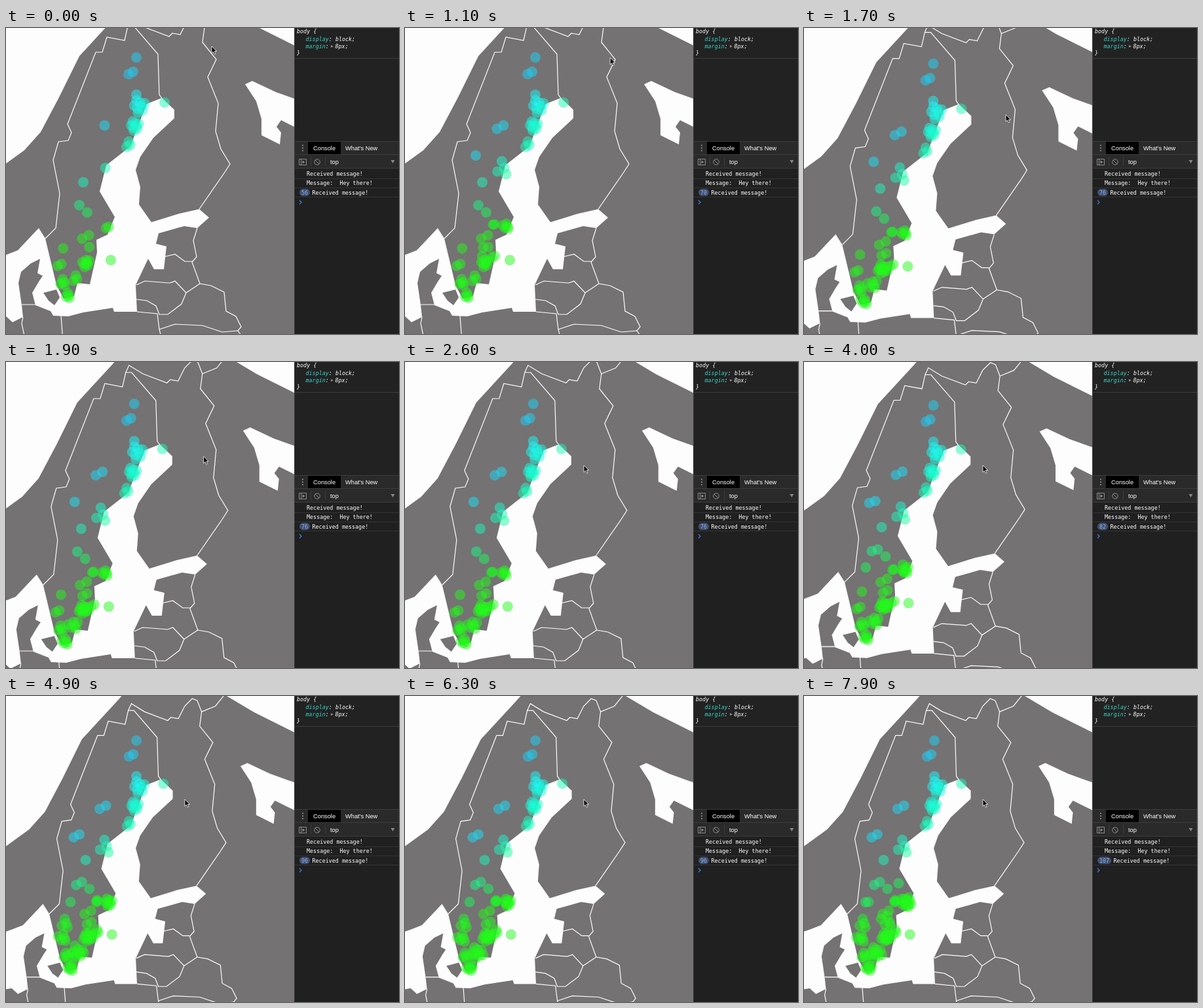
Recreate the animation shown at these times as an HTML page. Size 600 px wide and 468 px high, loop 8 s.

```html
<!DOCTYPE html>
<html lang="en">
<head>
<meta charset="utf-8">
<title>Live map with console</title>
<style>
  html, body { margin: 0; width: 100%; height: 100%; overflow: hidden; background: #222; }
  svg { display: block; width: 600px; height: 468px; }
  .sea { fill: #fefdfe; }
  .land { fill: #747273; }
  .border { fill: none; stroke: #fefdfe; stroke-width: 1.2; vector-effect: non-scaling-stroke; }
  .dots { fill-opacity: .5; }
  text { white-space: pre; fill: #fff; }
  .mono { font: 8.4px "DejaVu Sans Mono", monospace; }
  .rule { font-style: italic; }
  .ui { font: 9.3px "Liberation Sans", Arial, sans-serif; }
  .key { fill: #35d4c7; }
  .edge { stroke: #3c3c3c; }
  .icon { fill: none; stroke: #8c8c8c; }
</style>
</head>
<body>
<svg viewBox="0 0 600 468">
  <clipPath id="view"><rect width="440" height="468"/></clipPath>
  <g clip-path="url(#view)">
    <rect class="land" width="440" height="468"/>
    <g id="map">
      <!-- open water -->
      <path class="sea" d="M-30-60H206L169-19 112 43 81 106 53 159 28 187-30 229Z"/>
      <path class="sea" d="M330-60V-34L387 0 445 29 480 46V-60Z"/>
      <path class="sea" d="M365 86 376 81 412 98 440 108 480 122V170L440 151 420 141 413 151 420 160 418 178 390 164V139L382 112Z"/>
      <path class="sea" d="M-30 358 0 347 18 340 50 306 60 322 77 393 88 414 104 410 109 390 128 392 139 343 138 324 155 316 166 289 143 250 153 210 190 181 203 146 215 116 238 107 257 125V138L225 168 205 197 198 217 205 243 203 270 222 297 264 284 295 277 310 290 292 306 272 303 233 314 229 330 245 334 241 369H226L217 353 198 393 200 434H165L163 428 118 435 95 441 72 440 68 433 45 424H24L26 442 10 450 0 441-30 446Z"/>
      <path class="land" d="M52 353 38 360 23 373 19 390 24 424H45L40 405 50 388 56 379 48 375Z"/>
      <path class="land" d="M57 405 77 400 82 412 74 424 65 417Z"/>
      <!-- borders -->
      <path class="border" d="M60 322 76 306 82 253 72 202 80 174 95 172 100 160 94 147 137 37H147L154 14 181 19 186-3H195L232 40 234 102 239 109"/>
      <path class="border" d="M186-3 191-14 212-1 249 13 254 8 266 10 276-10 288-22 296-19 303-1 300 22 321 48 308 75 324 115 320 158 328 185 342 208 333 222 295 277"/>
      <path class="border" d="M303-1 325-10 341-30"/>
      <path class="border" d="M292 306 286 325 291 350 284 358 296 391 313 394 333 404 336 433 351 441 359 457 354 463 366 480"/>
      <path class="border" d="M241 350 258 346 273 357H284M199 393 212 387 250 390 258 387 275 405 296 391M199 415 215 417 229 425 234 438H247L268 422 275 405"/>
      <path class="border" d="M200 434 231 437 234 461 239 480M234 461 258 453 300 455 330 465 354 463M84 440 87 480M24 423H45M26 442 24 452 30 480"/>
    </g>
    <g id="dots" class="dots"></g>
  </g>

  <rect x="440" width="160" height="468" fill="#222"/>
  <g class="mono rule">
    <text x="444" y="8">body {</text>
    <text x="457.500" y="20"><tspan class="key">display</tspan>: block;</text>
    <text x="457.500" y="31"><tspan class="key">margin</tspan>:</text>
    <path d="M496 26 500 28 496 30Z" fill="#8a8a8a"/>
    <text x="502.500" y="31">8px;</text>
    <text x="444" y="41">}</text>
  </g>
  <path class="edge" d="M440 46.500H600"/>
  <rect x="440" y="173" width="160" height="41" fill="#2a2a2a"/>
  <path class="edge" d="M440 173.500H600M440 193.500H600M440 214.500H600"/>
  <rect x="461" y="174" width="50" height="19" fill="#000"/>
  <g fill="#9a9a9a"><circle cx="453" cy="179.500" r="1"/><circle cx="453" cy="183.500" r="1"/><circle cx="453" cy="187.500" r="1"/></g>
  <g class="ui">
    <text x="469" y="187">Console</text>
    <text x="518" y="187">What's New</text>
    <text x="495" y="207.500">top</text>
  </g>
  <path class="icon" d="M447.500 200.500H458.500V209.500H447.500ZM450.500 200.500V209.500"/>
  <path d="M452.500 202.500 456.500 205 452.500 207.500Z" fill="#8c8c8c"/>
  <path class="edge" d="M465.500 197V211M487.500 197V211"/>
  <circle class="icon" cx="475" cy="205" r="4.300"/>
  <path class="icon" d="M472 202 478 208"/>
  <path d="M587.500 202H593.500L590.500 207Z" fill="#888"/>
  <rect x="440" y="215" width="160" height="253" fill="#202021"/>
  <path class="edge" d="M440 230.500H600M440 244.500H600M440 258.500H600" style="stroke:#343434"/>
  <g class="mono">
    <text x="459" y="226">Received message!</text>
    <text x="459" y="240">Message:  Hey there!</text>
    <rect id="badge" x="448" y="246" width="16" height="11" rx="5.500" fill="#41506f"/>
    <text id="count" y="254.500" text-anchor="middle" style="fill:#8fb0ea"></text>
    <text id="label" y="254.500">Received message!</text>
  </g>
  <path d="M448 263.500 451 266.500 448 269.500" fill="none" stroke="#3b78cf" stroke-width="1.400"/>
  <path class="edge" d="M440.500 0V468"/>
  <path id="cursor" d="M0 0V10.500L2.500 8.300 4.300 12.200 6 11.400 4.300 7.600H7.600Z" fill="#000" stroke="#fff" stroke-width=".8"/>
</svg>
<script>
const LOOP = 8000, STEP = 64, SETTLE = 600;
const $ = id => document.getElementById(id);
const ramp = (t, from, to) => Math.min(1, Math.max(0, (t - from) / (to - from)));

// Start of each burst of messages; the first is over before the loop begins.
const bursts = [-1e5, 200, 3600, 7150];

// Towns, north to south: x, y, spread, and the messages in each burst.
const towns = [
  [199, 45, 0, "1"], [191, 67, 6, "2"], [199, 102, 0, "1"], [242, 114, 0, "1"],
  [204, 120, 11, "8"], [197, 150, 8, "8"], [146, 149, 9, "11"], [187, 179, 6, "3"],
  [104, 195, 8, "011"], [147, 214, 13, "13"], [118, 236, 0, "1"], [108, 271, 8, "101"],
  [142, 273, 0, "0001"], [124, 282, 0, "1"], [155, 304, 9, "2335"], [92, 303, 4, "0011"],
  [136, 302, 2, "021"], [122, 317, 9, "2"], [84, 337, 9, "103"], [124, 335, 10, "1103"],
  [136, 352, 5, "021"], [160, 355, 0, "1"], [122, 359, 9, "7311"], [82, 361, 8, "203"],
  [106, 384, 11, "334"], [86, 389, 6, "4"], [94, 409, 6, "411"]
];

// Hue shifts from blue in the north-west to green in the south-east.
function hue(x, y) {
  const dx = x - 199, dy = y - 45;
  return Math.max(118, 190 - .372 * dx - .106 * dy - .00098 * dy * dy);
}

function addDot(x, y, born) {
  const node = document.createElementNS("http://www.w3.org/2000/svg", "circle");
  node.setAttribute("r", 8);
  node.setAttribute("fill", `hsl(${hue(x, y)},95%,54%)`);
  $("dots").append(node);
  return { x, y, born, node };
}

// Dots of one town fill a disc along a golden-angle spiral.
const dots = [], sent = bursts.map(() => 0);
for (const [x, y, spread, plan] of towns) {
  const order = [...plan].flatMap((n, burst) => Array(+n).fill(burst));
  order.forEach((burst, i) => {
    const r = spread * Math.sqrt((i + .5) / order.length), a = i * 2.4;
    const born = bursts[burst] + ++sent[burst] * STEP;
    dots.push(addDot(x + r * Math.cos(a), y + r * Math.sin(a), born));
  });
}

function draw(t) {
  // The pointer comes down, drags the map, moves on, then zooms about its place.
  const come = ramp(t, 1000, 1550), drag = ramp(t, 1550, 1850), leave = ramp(t, 1850, 2200);
  const px = 314 - 4.3 * come - 3.2 * drag - 33.5 * leave;
  const py = 28 + 95 * come + 19 * drag + 16 * leave;
  $("cursor").setAttribute("transform", `translate(${px} ${py})`);

  const s = 1 - .043 * ramp(t, 3550, 4350);
  const ox = 272 - (272 + 3.2 * drag) * s, oy = 160 + (19 * drag - 160) * s;
  $("map").setAttribute("transform", `translate(${ox} ${oy}) scale(${s})`);

  let count = 0;
  for (const { x, y, born, node } of dots) {
    const shown = t >= born, left = 1 - ramp(t, born, born + SETTLE);
    count += shown;
    node.style.display = shown ? "" : "none";
    node.setAttribute("cx", ox + (x - left) * s);
    node.setAttribute("cy", oy + (y - 4 * left) * s);
  }

  const extra = count > 99 ? 5 : 0;
  $("count").textContent = count;
  $("count").setAttribute("x", 456 + extra / 2);
  $("badge").setAttribute("width", 16 + extra);
  $("label").setAttribute("x", 467.5 + extra);
}

const begin = performance.now();
function tick() {
  draw((performance.now() - begin) % LOOP);
  requestAnimationFrame(tick);
}
tick();
</script>
</body>
</html>
```
